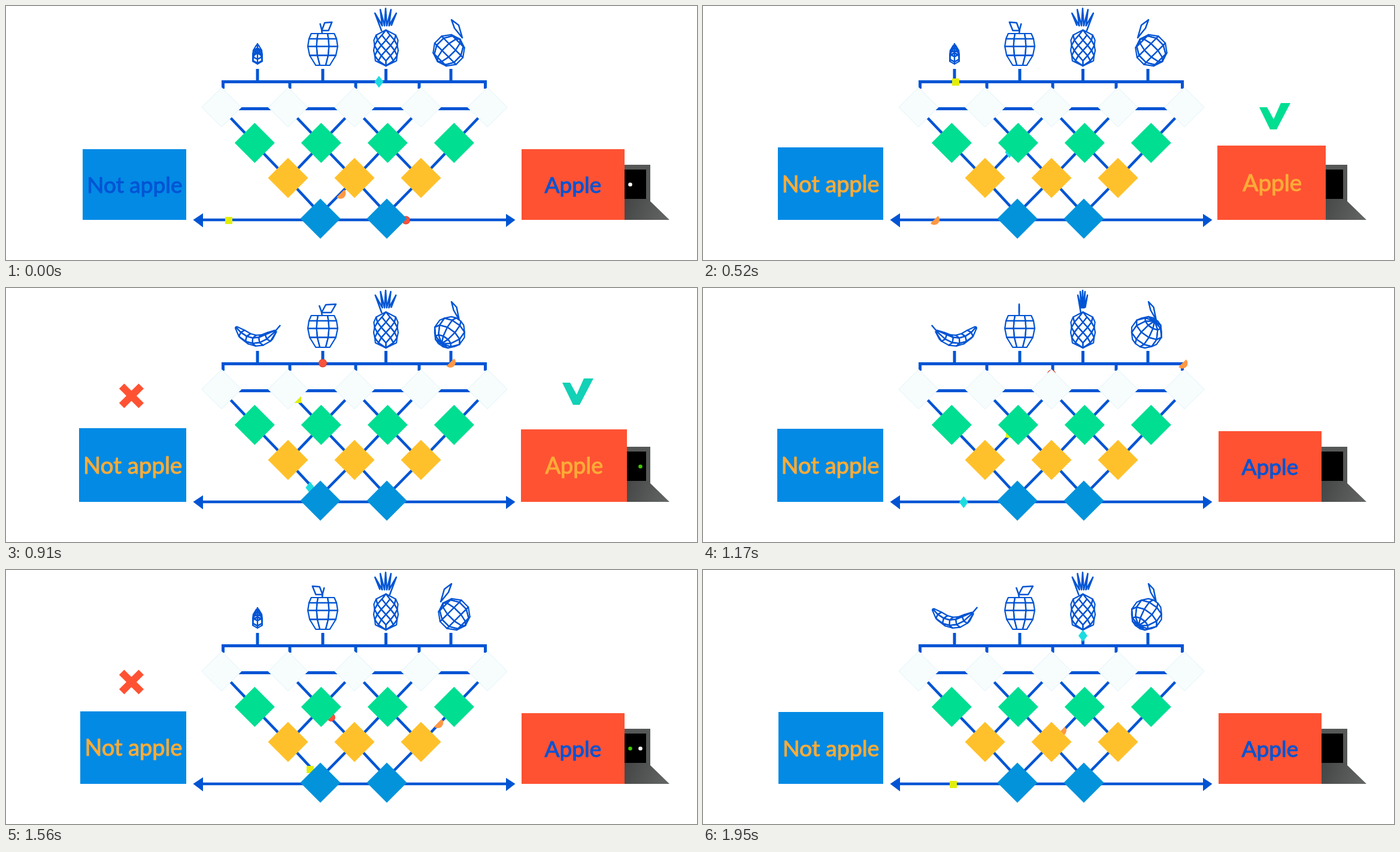
An HTML page with a canvas for the animation above (2.08 s loop, 1154 px wide and 424 px high).

```html
<!DOCTYPE html>
<html lang="en">
<head>
<meta charset="utf-8">
<title>Fruit classifier</title>
<style>
html, body { margin: 0; width: 100%; height: 100%; overflow: hidden; background: #fff; }
canvas { display: block; }
</style>
</head>
<body>
<canvas id="stage" width="1154" height="424"></canvas>
<script>
const ctx = document.getElementById('stage').getContext('2d');
const { sin, cos, sqrt, min, max, round, hypot } = Math;
const TAU = Math.PI * 2, STEP = 130, TICKS = 16;
const BLUE = '#0054d4', RED = '#ff5233', GREEN = '#00de92', ORANGE = '#fbac38';
const clamp = v => min(1, max(0, v));

function trace(points, close) {
  ctx.beginPath();
  points.forEach(([x, y]) => ctx.lineTo(x, y));
  if (close) ctx.closePath();
}
function fill(color, points) {
  trace(points, true);
  ctx.fillStyle = color;
  ctx.fill();
}
function line(points, width = 5, color = BLUE, close = false) {
  trace(points, close);
  ctx.strokeStyle = color;
  ctx.lineWidth = width;
  ctx.stroke();
}
function rect(color, x, y, w, h) {
  ctx.fillStyle = color;
  ctx.fillRect(x, y, w, h);
}
function disc(color, x, y, r, from = 0, to = TAU) {
  ctx.beginPath();
  ctx.arc(x, y, r, from, to);
  ctx.fillStyle = color;
  ctx.fill();
}
const rhombus = (x, y, w, h = w) => [[x, y - h], [x + w, y], [x, y + h], [x - w, y]];

// ---- Wireframe fruit: z points at the viewer, y points down ----
const spin = ([x, y, z = 0], a, cx) => [cx + x * cos(a) - z * sin(a), y];

function frontFaces(faces, a, cx) {
  for (const face of faces) {
    const p = face.map(v => spin(v, a, cx));
    const area = p.reduce((sum, [x, y], i) => {
      const [nx, ny] = p[(i + 1) % 4];
      return sum + x * ny - nx * y;
    }, 0);
    if (area < -0.5) line(p, 2.2, BLUE, true);
  }
}
const spunLine = (points, a, cx, close) => line(points.map(v => spin(v, a, cx)), 2.5, BLUE, close);

const quad = (k, j, vertex) => [vertex(k, j), vertex(k, j + 1), vertex(k + 1, j + 1), vertex(k + 1, j)];
const diamond = (k, j, vertex) => [vertex(k, j), vertex(k + 1, j), vertex(k + 2, j - 1), vertex(k + 1, j - 1)];
function mesh(rows, n, face, vertex) {
  return Array.from({ length: rows * n }, (_, i) => face(Math.floor(i / n), i % n, vertex));
}

const banana = mesh(6, 6, quad, (k, j) => {
  const s = -.85 + 1.85 * k / 6, w = k / 3 - 1, a = j * TAU / 6;
  const r = 9 * sqrt(1 - .95 * w ** 4), c = r * cos(a) / hypot(.88 * s, 1);
  return [50 * s + c * .88 * s, 88 - 22 * s * s + c, -r * sin(a)];
});
const apple = mesh(4, 8, quad, (k, j) => {
  const y = 46 + 53 * (k / 4) ** 1.3, r = 27 - .014 * (y - 67) ** 2, a = (j + .5) * TAU / 8;
  return [r * cos(a), y, r * sin(a)];
});
const pineapple = mesh(6, 8, diamond, (k, j) => {
  const v = 2 * k / 7 - 1, r = 20.5 * sqrt(1 - v ** 4), a = (j + k / 2) * TAU / 8;
  return [r * cos(a), 70 + 30 * v, r * sin(a)];
});
const orange = mesh(5, 10, quad, (k, j) => {
  const lat = (k / 5 - .5) * TAU / 2, a = j * TAU / 10, R = 26.5, tilt = TAU / 8;
  const x = R * cos(lat) * cos(a), y = R * sin(lat);
  return [x * cos(tilt) - y * sin(tilt), 74 + x * sin(tilt) + y * cos(tilt), R * cos(lat) * sin(a)];
});

// Five blades fan out from the base of the crown.
const crown = [[-7, 42]];
for (let i = -2; i <= 2; i++) crown.push([i * 9.5, 4 + 2 * i * i], [i * 4 + 2, 33]);

function drawFruit(tick) {
  const a = tick * TAU / 8;
  frontFaces(banana, a - TAU / 4, 420);
  spunLine([[-41, 73], [-48, 67], [-54, 62]], a - TAU / 4, 420);

  frontFaces(apple, 0, 529);
  spunLine([[0, 47], [-1, 40], [-5, 29]], a + TAU / 8, 528);
  spunLine([[-1, 41], [6, 28], [23, 27], [15, 41]], a + TAU / 8, 528, true);

  frontFaces(pineapple, 0, 634.5);
  spunLine(crown, a + .35, 634);

  frontFaces(orange, a, 744 - 4.5 * cos(a));
  spunLine([[18, 53], [5, 37], [0, 23], [12, 32]], a, 744, true);
}

// ---- Network ----
const row = (n, x, y, color) => Array.from({ length: n }, (_, i) => ({ x: x + 111 * i, y, color }));
const whites = row(5, 360, 169, '#f7fcfd');
const greens = row(4, 415.3, 228.5, GREEN);
const yellows = row(3, 471, 287, '#ffc12b');
const blues = row(2, 525, 355, '#0293db');
const stems = [420, 529, 634.5, 743];

function drawLines() {
  const link = (p, q) => line([[p.x, p.y + 2], [q.x, p.y + 60]], 4.6);
  for (const x of stems) line([[x, 105], [x, 126]]);
  line([[360, 126.5], [803, 126.5]]);
  for (const x of [362.5, 474, 584, 690, 800.5]) line([[x, 126], [x, 138]]);
  line([[360, 171.5], [804, 171.5]]);
  // The outer whites only link inwards, as does each second diagonal.
  greens.forEach((g, i) => {
    link(whites[i < 3 ? i : 4], g);
    if (i === 1 || i === 2) link(whites[i + 1], g);
  });
  for (const [upper, lower] of [[greens, yellows], [yellows, blues]])
    lower.forEach((q, i) => { link(upper[i], q); link(upper[i + 1], q); });
  line([[322, 357], [840, 357]], 4.6);
  fill(BLUE, [[312.5, 357], [329, 346], [329, 369.5]]);
  fill(BLUE, [[850.5, 357], [835, 347], [835, 369]]);
}
function drawNodes() {
  for (const { x, y, color } of [...whites, ...greens, ...yellows, ...blues]) {
    fill(color, rhombus(x, y, 33.5));
    if (y === 169) line(rhombus(x, y, 33), 1, '#dff4f8', true);
  }
}

// ---- Tokens: fall from a fruit, cross the network, leave along the base ----
// times: start, reach first node, reach last node, reach the arrow
const tokens = [
  { stem: 0, route: [whites[1], greens[1], yellows[0], blues[0]], exit: 325, times: [2, 6.4, 12.7, 17],
    draw: (x, y) => rect('#e2ee0a', round(x) - 6, round(y) - 6, 12, 12) },
  { stem: 1, route: [whites[2], greens[1], yellows[1], blues[1]], exit: 838, times: [5.2, 9.5, 15.4, 19.2],
    draw: (x, y) => { disc('#d8432f', x, y, 7); disc('#fb523c', x, y, 6); } },
  { stem: 2, route: [whites[2], greens[1], yellows[0], blues[0]], exit: 325, times: [14.4, 17.4, 23.7, 26.6],
    draw: (x, y) => fill('#1cdce0', rhombus(x, y, 7.5, 10)) },
  { stem: 3, route: [whites[4], greens[3], yellows[2], greens[2], yellows[1], blues[0]], exit: 325, times: [5, 10, 16.9, 21.4],
    draw: (x, y) => disc('#ff9845', x - 1, y - 1, 9, -TAU / 8, TAU * 3 / 8) },
];

// Point at fraction f of the length of a polyline.
function along(points, f) {
  const legs = points.slice(1).map((p, i) => hypot(p.x - points[i].x, p.y - points[i].y));
  let rest = f * legs.reduce((a, b) => a + b), i = 0;
  while (i < legs.length - 1 && rest > legs[i]) rest -= legs[i++];
  const p = points[i], q = points[i + 1], t = rest / legs[i];
  return [p.x + (q.x - p.x) * t, p.y + (q.y - p.y) * t];
}
function drawTokens(tick) {
  for (const { stem, route, exit, times, draw } of tokens) {
    const t = tick < times[0] ? tick + TICKS : tick;
    const part = times.findIndex(end => end > t) - 1;
    if (part < 0) continue;
    const f = (t - times[part]) / (times[part + 1] - times[part]);
    const x = stems[stem], first = route[0], last = route[route.length - 1];
    const fall = [{ x, y: 105 }, { x, y: 126.5 }, { x: first.x, y: 126.5 }, first];
    const leave = [{ x: last.x, y: 357.5 }, { x: exit, y: 357.5 }];
    draw(...along([fall, route, leave][part], part ? f : f * f));
  }
}

// ---- Answer boxes ----
const pulse = (u, hold) => clamp(min(u + .5, (hold - u) / 2));

function answer(label, color, left, right, anchor, textX, align, grow) {
  const top = round(239 - 6 * grow), scale = 1 + .045 * grow;
  left = round(left);
  rect(color, left, top, round(right) - left, 357 - top);
  ctx.save();
  ctx.translate(anchor, 357);
  ctx.scale(scale, scale);
  ctx.font = '37px Lato, "Open Sans", sans-serif';
  ctx.textAlign = align;
  ctx.fillStyle = ctx.strokeStyle = grow ? ORANGE : BLUE;
  ctx.lineWidth = 1;
  ctx.fillText(label, textX, -45.5);
  ctx.strokeText(label, textX, -45.5);
  ctx.restore();
}

function drawReject(tick) {
  // Three arrivals are spread evenly over the loop.
  const u = (tick + 4 + .67) % (TICKS / 3) - .67, grow = pulse(u, 3.6);
  answer('Not apple', '#028ae5', 128 - 7 * grow, 301, 301, -6.5, 'right', grow);
  if (u > -.1 && u < 2.2) {
    const x = 209.5, y = u < .2 ? 187 : 180, h = 16.3;
    line([[x - h, y - h], [x + h, y + h]], 12, RED);
    line([[x + h, y - h], [x - h, y + h]], 12, RED);
  }
}

function drawAccept(tick) {
  const shade = ctx.createLinearGradient(1033, 330, 1100, 357);
  shade.addColorStop(0, '#454747');
  shade.addColorStop(1, '#626464');
  rect('#565858', 1020, 265, 56, 62);
  fill(shade, [[1020, 322], [1076, 322], [1076, 326], [1108, 357], [1020, 357]]);
  rect('#000', 1020, 273, 49, 49);
  if (tick % 12 === 0) disc(tick ? '#41c400' : '#fff', 1042.5, 298, 3.3);
  if (tick % 5 === 2) disc(tick < 10 ? '#41c400' : '#fff', 1059.5, 298, 3.3);

  const grow = pulse(tick - 3, 5);
  answer('Apple', RED, 861 - 2 * grow, 1033 + 7 * grow, 860, 39.5, 'left', grow);
  if (grow) {
    const f = (tick - 4) / 3, tint = clamp(f), x = 955, y = 162 - 11 * f;
    fill(`rgb(${18 * tint}, ${222 - 13 * tint}, ${146 + 36 * tint})`,
      [[-26, 7], [-13, 7], [-2, 27], [10, 0], [26, 0], [3, 44], [-8, 44]].map(([dx, dy]) => [x + dx, y + dy]));
  }
}

const start = performance.now();
function render() {
  const tick = Math.floor((performance.now() - start) / STEP) % TICKS;
  rect('#fff', 0, 0, 1154, 424);
  ctx.lineJoin = 'round';
  drawFruit(tick);
  drawLines();
  drawTokens(tick);
  drawNodes();
  drawReject(tick);
  drawAccept(tick);
  requestAnimationFrame(render);
}
render();
</script>
</body>
</html>
```
